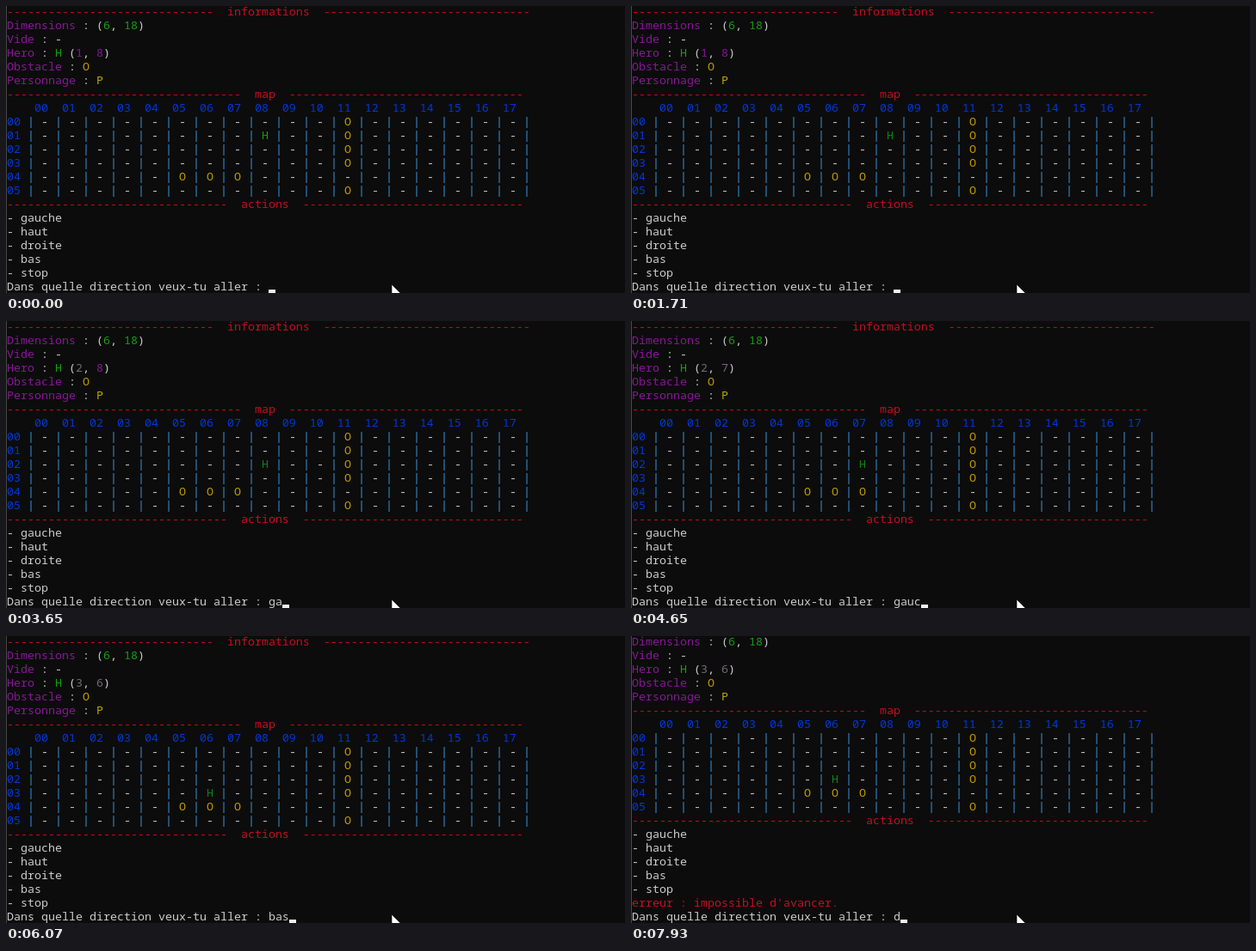
These frames come from a looping animation (719x334 px, 8000 ms). An HTML page:

```html
<!DOCTYPE html>
<html lang="fr">
<head>
<meta charset="utf-8">
<title>Map</title>
<style>
html, body { margin: 0; width: 100%; height: 100%; overflow: hidden; background: #0c0c0c; }
#stage { position: relative; width: 719px; height: 334px; overflow: hidden; background: #0c0c0c; }
#screen {
  position: absolute; left: 1px; bottom: 0; margin: 0; color: #ccc;
  font: calc(40px / 3)/16px "Noto Sans Mono", "DejaVu Sans Mono", monospace;
  font-variant-ligatures: none;
}
#edge { position: absolute; left: 0; top: 0; width: 1px; height: 100%; background: #484848; }
#caret { position: absolute; top: 330px; width: 8px; height: 4px; background: #f2f2f2; }
#pointer { position: absolute; left: 447px; top: 323px; }
.red { color: #c50f1f; }
.blue { color: #0037da; }
.bar { color: #3a96dd; }
.label { color: #881798; }
.green { color: #13a10e; }
.dim { color: #11811a; }
.grey { color: #76667c; }
.gold { color: #c19c00; }
.lime { color: #bcaa00; }
</style>
</head>
<body>
<div id="stage">
  <pre id="screen"></pre>
  <div id="edge"></div>
  <div id="caret"></div>
  <svg id="pointer" width="14" height="11">
    <path d="M1 1V17L5 13.5 7.5 19 10 18 7.5 12.5H12.5Z" fill="#fff" stroke="#000" stroke-width=".6"/>
  </svg>
</div>
<script>
const LOOP = 8000, ROWS = 6, COLS = 18;
const PROMPT = "Dans quelle direction veux-tu aller : ";

// Typed text from each time on; a trailing "_" means the caret is lit.
const typing = [
  [0, "_"], [380, ""], [460, "h_"], [530, "ha_"], [610, "hau_"], [690, "haut_"], [760, "_"], [840, ""],
  [1390, "b_"], [1540, "bas_"], [1710, "_"],
  [1940, ""], [2010, "b_"], [2090, "ba_"], [2160, "bas_"], [2330, "_"],
  [2480, ""], [2960, "_"], [3490, ""],
  [3570, "g_"], [3650, "ga_"], [3720, "gau_"], [3800, "gauc_"], [3880, "gauch_"], [3950, "gauche_"],
  [4030, "gauche"], [4110, "_"],
  [4260, ""], [4340, "g_"], [4410, "ga_"], [4580, "gau_"], [4650, "gauc_"], [4820, "gauch_"],
  [4890, "gauche_"], [4970, "_"], [5120, ""],
  [5290, "ba_"], [5360, "bas_"], [5590, ""],
  [5920, "b_"], [6000, "ba_"], [6070, "bas_"], [6150, ""], [6700, "_"],
  [7080, "b_"], [7230, "bas_"], [7400, "_"], [7780, ""], [7930, "d_"]
];
const moves = [[0, 1, 8], [760, 0, 8], [1710, 1, 8], [2330, 2, 8], [4110, 2, 7], [4970, 2, 6], [5590, 3, 6]];
const ERROR_AT = 6150;

const range = n => [...Array(n).keys()];
const two = n => String(n).padStart(2, "0");
const paint = (cls, text) => `<span class="${cls}">${text}</span>`;
const latest = (list, t) => list.findLast(item => item[0] <= t);
const field = (name, value) => paint("label", name) + " : " + value;

function rule(title) {
  const dashes = "-".repeat((72 - title.length) / 2);
  return paint("red", `${dashes}  ${title}  ${dashes}`);
}

function isObstacle(r, c) {
  return r === 4 ? c >= 5 && c <= 7 : c === 11;
}

function mapRow(r, hero, heroColor) {
  const bar = paint("bar", "|");
  const cells = range(COLS).map(c => {
    if (r === hero[0] && c === hero[1]) return paint(heroColor, "H");
    return isObstacle(r, c) ? paint("gold", "O") : "-";
  });
  return paint("blue", two(r)) + ` ${bar} ` + cells.join(` ${bar} `) + ` ${bar}`;
}

function lines(t, input) {
  const [start, row, col] = latest(moves, t);
  const coord = n => paint(n === 8 || n === 1 ? "label" : "grey", n);
  const list = [
    rule("informations"),
    field("Dimensions", `(${paint("green", ROWS)}, ${paint("green", COLS)})`),
    field("Vide", "-"),
    field("Hero", `${paint("green", "H")} (${coord(row)}, ${coord(col)})`),
    field("Obstacle", paint("gold", "O")),
    field("Personnage", paint("lime", "P")),
    rule("map"),
    paint("blue", "    " + range(COLS).map(two).join("  ")),
    ...range(ROWS).map(r => mapRow(r, [row, col], start ? "dim" : "green")),
    rule("actions"),
    ...["gauche", "haut", "droite", "bas", "stop"].map(a => "- " + a)
  ];
  if (t >= ERROR_AT) list.push(paint("red", "erreur : impossible d'avancer."));
  list.push(PROMPT + input);
  return list;
}

const screenEl = document.getElementById("screen");
const caret = document.getElementById("caret");
let shown;

function draw() {
  const t = performance.now() % LOOP;
  const step = latest(typing, t);
  if (step !== shown) {
    shown = step;
    const input = step[1].replace("_", "");
    screenEl.innerHTML = lines(t, input).join("\n");
    caret.style.left = 1 + 8 * (PROMPT.length + input.length) + "px";
    caret.style.visibility = step[1].endsWith("_") ? "visible" : "hidden";
  }
  requestAnimationFrame(draw);
}
draw();
</script>
</body>
</html>
```
